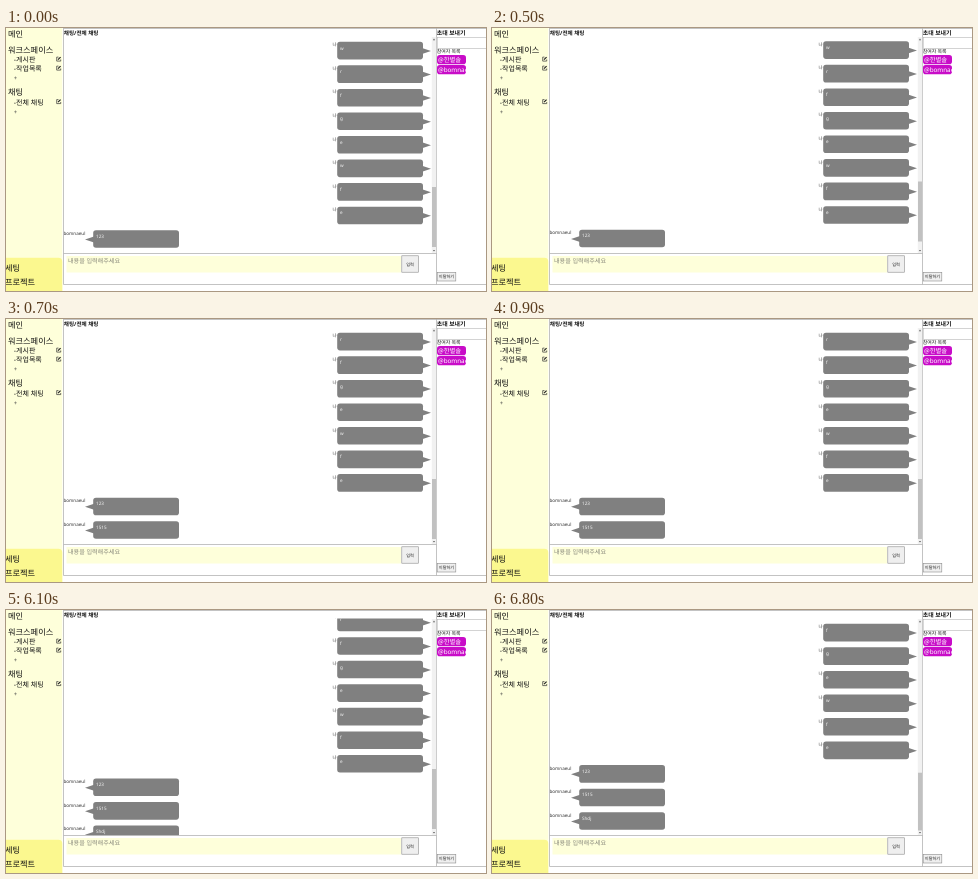
Write an HTML page that moves like this. It is 480x263 px and loops after 7.2 s.

```html
<!DOCTYPE html>
<html lang="ko">
<head>
<meta charset="utf-8">
<title>채팅</title>
<style>
  html, body { margin: 0; width: 100%; height: 100%; overflow: hidden; background: #fff; }
  svg { display: block; width: 100vw; height: 100vh; }
  text { font-family: "Noto Sans", "Noto Sans CJK KR", "Noto Sans CJK", sans-serif; text-rendering: geometricPrecision; white-space: pre; }
</style>
</head>
<body>
<svg id="stage" viewBox="0 0 480 263"></svg>
<script>
const NS = 'http://www.w3.org/2000/svg';
const stage = document.getElementById('stage');

function add(parent, tag, attrs, content) {
  const node = document.createElementNS(NS, tag);
  for (const key in attrs) node.setAttribute(key, attrs[key]);
  if (content) node.textContent = content;
  parent.appendChild(node);
  return node;
}
const box = (parent, x, y, width, height, fill, more) =>
  add(parent, 'rect', { x, y, width, height, fill, ...more });
const label = (parent, x, y, size, content, fill = '#111', more) =>
  add(parent, 'text', { x, y, 'font-size': size, fill, ...more }, content);
const path = (parent, d, attrs) => add(parent, 'path', { d, ...attrs });

const BOLD = { 'font-weight': 700 };
const LINE = { fill: 'none', stroke: '#b4b4b4', 'stroke-width': 0.8 };
const ROW = 23.55;
const FIRST_ROW = 13.8;
const LOOP = 7200;
const USER = 'bomnaeul';

// start time, scroll offset, visible replies, scrollbar thumb top
const STEPS = [
  [0, 0, 1, 159],
  [500, 0.5, 2, 153.5],
  [600, 11.8, 2, 156.8],
  [700, ROW, 2, 160],
  [6100, 33.7, 3, 159],
  [6200, ROW * 2, 3, 162.7]
];

function drawSidebar() {
  box(stage, 0, 0, 56.3, 263, '#feffda');
  box(stage, -6, 229.7, 62.3, 40, '#fbf88f', { rx: 4 });
  label(stage, 2, 9, 8.2, '메인');
  label(stage, 2, 25, 8.2, '워크스페이스');
  label(stage, 7.8, 34.2, 7, '-게시판');
  label(stage, 7.8, 43, 7, '-작업목록');
  label(stage, 7.8, 51.5, 6, '+', '#444');
  label(stage, 2, 67.4, 8.2, '채팅');
  label(stage, 7.8, 76.5, 7, '-전체 채팅');
  label(stage, 7.8, 85.5, 6, '+', '#444');
  label(stage, -1, 242.6, 8.2, '세팅');
  label(stage, -1, 257.4, 8.2, '프로젝트');
  for (const y of [28.5, 37.5, 71]) {
    path(stage, `M52.5 ${y + .6}H50.7V${y + 4.6}H54.7V${y + 3}`, { fill: 'none', stroke: '#333', 'stroke-width': 0.7 });
    path(stage, `M52 ${y + 3.2}L54.6 ${y + .6}`, { stroke: '#222', 'stroke-width': 1.2 });
  }
}

function drawBubble(parent, row, content, own) {
  const g = add(parent, 'g', { transform: `translate(0 ${FIRST_ROW + row * ROW})` });
  const x = own ? 331.2 : 87.2;
  label(g, own ? 326.4 : 57.4, 4.5, own ? 4.5 : 4.6, own ? '나' : USER, '#333');
  box(g, x, 0, 85.8, 17.6, '#808080', { rx: 2.8 });
  path(g, own ? 'M416 6.2L425 9.2L416 12.2Z' : 'M88 6.2L79 9.2L88 12.2Z', { fill: '#808080' });
  label(g, x + 2.8, 7.8, 4.6, content, '#f4f4f4');
  return g;
}

function drawComposer() {
  path(stage, 'M57.5 0V256.5H480M57.5 0.5H480M430.5 0V256.5M57.5 225.5H430.5', LINE);
  label(stage, 57.8, 6.7, 5.6, '채팅/전체 채팅', '#111', BOLD);
  box(stage, 60.5, 228, 334.5, 16.5, '#feffda');
  label(stage, 62, 235.4, 6.1, '내용을 입력해주세요', '#8a8a7c');
  box(stage, 395.8, 227.8, 16.5, 16.4, '#efefef', { stroke: '#8c8c8c', 'stroke-width': 0.6 });
  label(stage, 404.1, 237.5, 4.2, '입력', '#222', { 'text-anchor': 'middle' });
}

function drawScrollbar() {
  box(stage, 425.8, 9, 4.4, 216, '#f1f1f1');
  path(stage, 'M426.9 12.2L428 10.6L429.1 12.2ZM426.9 222L428 223.6L429.1 222Z', { fill: '#606060' });
  return box(stage, 426, 159, 4, 60, '#c1c1c1');
}

function drawMembers() {
  label(stage, 430.8, 7, 5.9, '초대 보내기', '#111', BOLD);
  box(stage, 431.2, 9.3, 52, 11.2, '#fff', { stroke: '#a8a8a8', 'stroke-width': 0.5 });
  label(stage, 430.8, 25.2, 4.9, '참여자 목록', '#222');
  const clip = add(stage, 'clipPath', { id: 'pills' });
  box(clip, 430.8, 26, 29.4, 21);
  const list = add(stage, 'g', { 'clip-path': 'url(#pills)' });
  ['@한별솔', '@' + USER].forEach((name, i) => {
    const y = 27 + i * 10;
    box(list, 431, y, 29, 9.2, '#c80cc8', { rx: 2.8 });
    label(list, 432, y + 6.8, 6.3, name, '#fff');
  });
  box(stage, 431.2, 244.4, 18.6, 8.6, '#efefef', { stroke: '#8c8c8c', 'stroke-width': 0.6 });
  label(stage, 440.5, 250.3, 4.2, '이탈하기', '#222', { 'text-anchor': 'middle' });
}

drawSidebar();
const chatClip = add(stage, 'clipPath', { id: 'chat' });
box(chatClip, 57, 8.6, 369, 216.6);
const chat = add(stage, 'g', { 'clip-path': 'url(#chat)' });
const messages = add(chat, 'g', {});
const own = [...'wrfgewfe'];
own.forEach((letter, i) => drawBubble(messages, i, letter, true));
const replies = ['123', '1515', 'Shdj'].map((content, i) =>
  drawBubble(messages, own.length + i, content, false));
drawComposer();
const thumb = drawScrollbar();
drawMembers();

function render(time) {
  const [, scroll, count, top] = STEPS.filter(step => step[0] <= time).pop();
  messages.setAttribute('transform', `translate(0 ${-scroll})`);
  replies.forEach((reply, i) => reply.setAttribute('visibility', i < count ? 'visible' : 'hidden'));
  thumb.setAttribute('y', top);
  thumb.setAttribute('height', Math.min(60, 220.5 - top));
}

const start = performance.now();
function tick() {
  render((performance.now() - start) % LOOP);
  requestAnimationFrame(tick);
}
tick();
</script>
</body>
</html>
```
